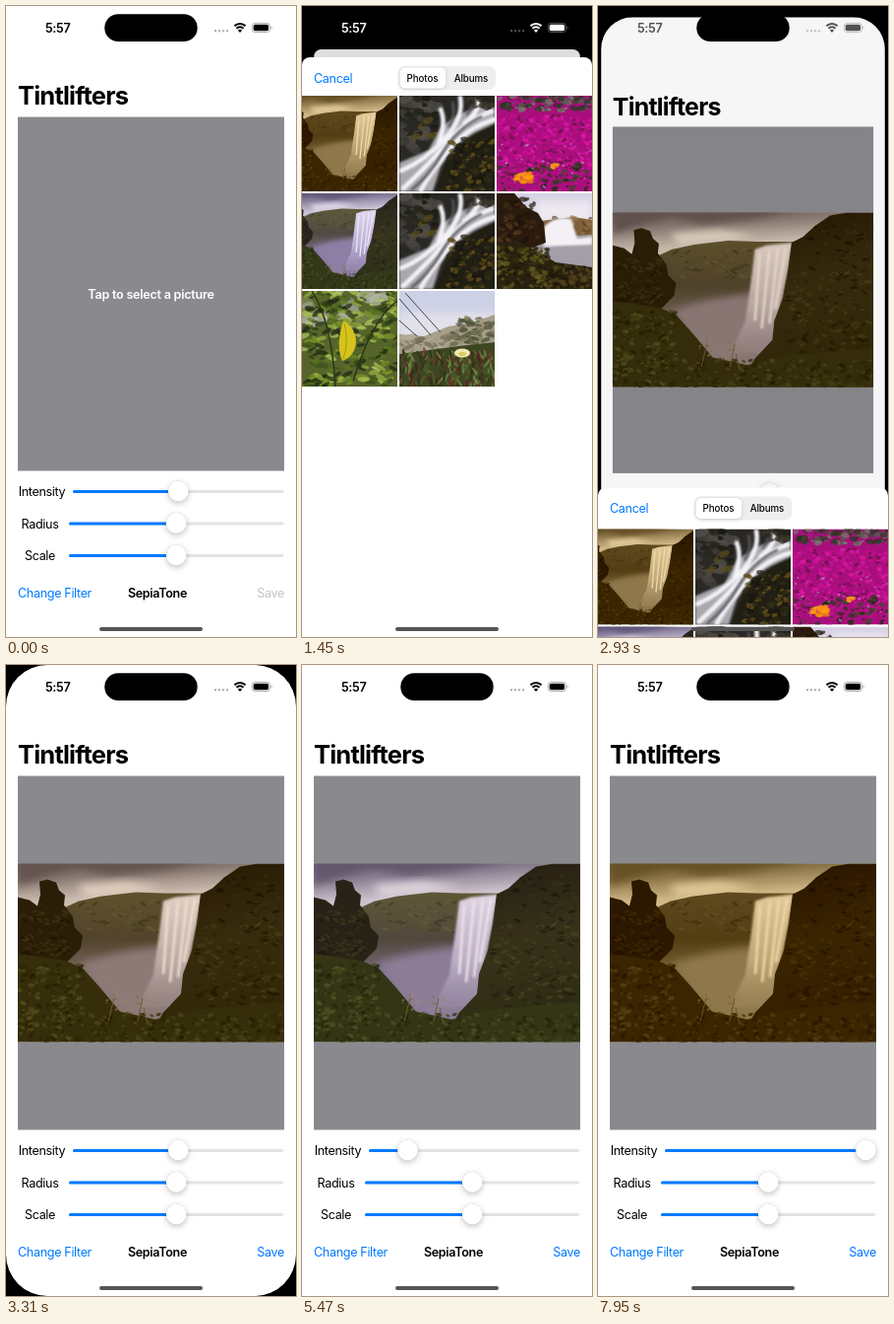
An HTML page for the animation above (8000 ms loop, 295 by 640 pixels).

```html
<!DOCTYPE html>
<html lang="en">
<head>
<meta charset="utf-8">
<title>Photo filter demo</title>
<style>
  html, body { margin: 0; height: 100%; overflow: hidden; background: #000; }
  svg { display: block; width: 100vw; height: 100vh; }
  text { font: 12.6px Inter, "Liberation Sans", sans-serif; letter-spacing: -.35px; }
  .bold { font-weight: 600; }
  .blue { fill: #007aff; }
  .mid { text-anchor: middle; }
  .title { font-size: 25.5px; font-weight: 700; letter-spacing: -.8px; }
  .tab { font-size: 9.75px; font-weight: 500; letter-spacing: -.1px; }
  .knob { fill: #fff; filter: drop-shadow(0 2px 3px rgba(0,0,0,.2)) drop-shadow(0 0 .6px rgba(0,0,0,.25)); }
</style>
</head>
<body>
<svg viewBox="0 0 295 640">
  <defs>
    <clipPath id="screen"><rect id="corners" width="295" height="640"/></clipPath>
    <filter id="tone" color-interpolation-filters="sRGB" x="0" y="0" width="1" height="1"><feColorMatrix/></filter>
    <filter id="sepia" color-interpolation-filters="sRGB" x="0" y="0" width="1" height="1"><feColorMatrix/></filter>
    <filter id="soft" x="-.3" y="-.3" width="1.6" height="1.6"><feGaussianBlur stdDeviation="4"/></filter>
    <filter id="silky" x="-.2" y="-.2" width="1.4" height="1.4"><feGaussianBlur stdDeviation="1.3"/></filter>
    <linearGradient id="sky" x2=".1" y2="1">
      <stop stop-color="#6a6080"/><stop offset=".1" stop-color="#8a809e"/><stop offset=".22" stop-color="#cbc3d8"/>
    </linearGradient>
    <linearGradient id="plateau" x2="0" y2="1">
      <stop stop-color="#5d5a3a"/><stop offset=".35" stop-color="#514a44"/><stop offset=".7" stop-color="#857799"/>
    </linearGradient>
    <linearGradient id="water" x2="0" y2="1">
      <stop stop-color="#ded5ee"/><stop offset=".6" stop-color="#b9add2"/><stop offset="1" stop-color="#9f92bb" stop-opacity=".4"/>
    </linearGradient>
    <linearGradient id="cliff" x2=".2" y2="1">
      <stop stop-color="#211d18"/><stop offset=".5" stop-color="#37331f"/><stop offset="1" stop-color="#2b3017"/>
    </linearGradient>
    <symbol id="falls" viewBox="0 0 271 181"></symbol>
    <symbol id="stream" viewBox="0 0 97 97"></symbol>
    <symbol id="flowers" viewBox="0 0 97 97"></symbol>
    <symbol id="cove" viewBox="0 0 97 97"></symbol>
    <symbol id="leaves" viewBox="0 0 97 97"></symbol>
    <symbol id="dune" viewBox="0 0 97 97"></symbol>
  </defs>
  <rect width="295" height="640"/>

  <g id="app" clip-path="url(#screen)">
    <rect width="295" height="640" fill="#fff"/>
    <g id="content">
      <text class="title" x="12" y="100.3">Tintlifters</text>
      <rect x="12" y="112.5" width="271" height="359" fill="#8a8a8e"/>
      <text class="bold mid" x="147.5" y="296.7" fill="#fff" style="letter-spacing:-.25px">Tap to select a picture</text>
      <use id="photo" href="#falls" x="12" y="201.5" width="271" height="181" filter="url(#tone)"/>
      <g id="sliders"></g>
      <text class="blue" x="12" y="599.5">Change Filter</text>
      <text class="bold mid" x="154" y="599.5">SepiaTone</text>
      <text id="save" x="283" y="599.5" text-anchor="end">Save</text>
    </g>
    <rect id="dim" width="295" height="640"/>
  </g>

  <rect x="100.3" y="8.3" width="94.4" height="27.8" rx="13.9"/>
  <g id="status" fill="currentColor">
    <text class="bold" x="40" y="26.7">5:57</text>
    <path d="M213 25.3h14" stroke="currentColor" stroke-width="2.4" stroke-linecap="round" stroke-dasharray="0 4" opacity=".3"/>
    <g fill="none" stroke="currentColor" stroke-width="2">
      <path d="M232.4 20.3a8 8 0 0 1 11.2 0M234.5 22.8a5 5 0 0 1 7 0"/>
    </g>
    <path d="M238 27l-2.1-2.2a3 3 0 0 1 4.2 0z"/>
    <rect x="250.3" y="17.4" width="18.2" height="9.2" rx="3" fill="none" stroke="currentColor" stroke-width=".8" opacity=".4"/>
    <rect x="251.7" y="18.8" width="15.4" height="6.4" rx="1.8"/>
    <path d="M269.7 20.5v3a1.7 1.7 0 0 0 0-3z" opacity=".4"/>
  </g>

  <g id="sheet">
    <rect width="295" height="660" rx="8" fill="#fff"/>
    <text class="blue" x="12" y="25.7">Cancel</text>
    <g id="loading">
      <g id="spinner" transform="translate(147.5 292.5)" stroke="#77777b" stroke-width="2.5" stroke-linecap="round"></g>
      <text class="mid" x="147.5" y="320.7" fill="#8a8a8e" style="font-size:11.25px;letter-spacing:-.25px">Loading...</text>
    </g>
    <g id="picker">
      <rect x="98" y="9" width="99" height="24" rx="6.7" fill="#eeeeef"/>
      <rect x="99.7" y="10.5" width="46.5" height="21" rx="5.3" fill="#fff" style="filter:drop-shadow(0 1.5px 2px rgba(0,0,0,.15))"/>
      <text class="tab mid bold" x="122.5" y="24.6">Photos</text>
      <text class="tab mid" x="172" y="24.6">Albums</text>
      <g id="grid"></g>
    </g>
  </g>
  <rect x="95" y="630" width="105" height="4" rx="2" fill="#555"/>
</svg>

<script>
const $ = id => document.getElementById(id);
const set = (el, attrs) => { for (const k in attrs) el.setAttribute(k, attrs[k]); };
const show = (el, on) => set(el, { visibility: on ? 'visible' : 'hidden' });
const clamp = v => Math.max(0, Math.min(1, v));
const ramp = (t, start, length) => clamp((t - start) / length);

let seed = 7;
const random = () => (seed = seed * 16807 % 2147483647) / 2147483647;

const shape = (fill, d, extra = '') => `<path fill="${fill}" d="${d}" ${extra}/>`;
const blurred = (fill, d, filter = 'soft', extra = '') => shape(fill, d, `filter="url(#${filter})" ${extra}`);
const base = fill => shape(fill, 'M0 0h97v97H0z');

// Scattered translucent ellipses inside a box, tilted around a given angle
function blobs(n, x, y, w, h, r, colors, ratio = .6, angle = 0) {
  let out = '<g fill-opacity=".7">';
  for (let i = 0; i < n; i++) {
    const size = r * (.5 + random()), cx = x + random() * w, cy = y + random() * h;
    const fill = colors[Math.floor(random() * colors.length)];
    out += `<ellipse cx="${cx}" cy="${cy}" rx="${size}" ry="${size * ratio}" fill="${fill}"
      transform="rotate(${angle + random() * 80 - 40} ${cx} ${cy})"/>`;
  }
  return out + '</g>';
}

$('falls').innerHTML =
  shape('url(#sky)', 'M0 0h271v181H0z') +
  blurred('#62587a', 'M0-8H215L150 6L95 12L60 5L25 14L0 22z') +
  blurred('#ddd6e6', 'M60 22L110 18L150 24L120 30L70 34z') +
  shape('url(#plateau)', 'M40 48L62 38L85 33L120 29L150 30L188 30L200 165H60z') +
  blobs(70, 65, 37, 78, 32, 3, ['#5a5736', '#413c30', '#625e40'], .35) +
  blurred('#8c7ea4', 'M62 102Q100 88 146 84L172 110L160 158H110z') +
  blurred('url(#water)', 'M148 38L160 34L187 31L182 60L174 100L164 146L122 146L138 112L144 70z', 'silky') +
  blurred('none', 'M153 42L148 112M163 38L155 120M172 37L163 115M180 36L169 100', 'silky', 'stroke="#ece5f6" stroke-width="2.5"') +
  shape('url(#cliff)', 'M186 31L198 25L210 14L226 3L244 0H271V181H140L147 152L166 132L168 112L177 88L182 62z') +
  blobs(70, 200, 12, 70, 50, 3, ['#2d2820', '#1c1916', '#3a3425'], .4) +
  blobs(150, 182, 62, 85, 85, 3, ['#454323', '#2b281a', '#4a4926', '#201e15'], .4) +
  shape('#28241e', 'M0 34L12 37L20 43L23 31L22 18L30 16L39 19L42 27L48 32L47 42L56 54L58 65L66 73L64 86L48 102L0 100z') +
  blobs(80, 3, 48, 50, 45, 3, ['#37321f', '#1d1a16', '#403b24'], .4) +
  shape('#323818', 'M0 92L22 94L50 99L66 106L84 126L104 150L140 158L180 148L271 140V181H0z') +
  blobs(200, 0, 102, 66, 80, 2.4, ['#454f20', '#282e16', '#515c28', '#21260f']) +
  blobs(200, 72, 152, 200, 30, 2.4, ['#3f4820', '#282e16', '#4b5327', '#21260f']) +
  shape('none', 'M92 160L98 136M122 160L127 136M132 162L128 146', 'stroke="#6d6336"') +
  blobs(20, 90, 132, 45, 16, 1.4, ['#a8857c', '#7d7348']);

$('stream').innerHTML = base('#2a2824') +
  blobs(50, 0, 0, 40, 55, 6, ['#43413c', '#56534d', '#2b2a25', '#1d1c18']) +
  blobs(30, 14, 0, 26, 42, 4, ['#5a4c1c', '#25241a', '#151510']) +
  blurred('#a9a8ad', 'M97 8L80 12L62 18L42 32L30 55L0 68V97H34L42 72L54 52L76 38L97 28z', 'silky') +
  blurred('none', 'M94 16Q66 26 50 46T4 94M62 2Q66 22 46 44T2 76M42 14Q48 28 40 48M97 24Q68 32 48 58T22 96M80 2Q84 14 66 28',
    'silky', 'stroke="#f4f3f8" stroke-width="4.5" stroke-linecap="round"') +
  blurred('none', 'M54 6Q58 20 50 32M84 21Q58 34 44 58T12 96M76 4Q74 14 68 20', 'silky', 'stroke="#58565a" stroke-width="2.5"') +
  shape('#211e13', 'M97 30L80 38L62 50L50 62L44 78L36 97H97z') +
  blobs(120, 50, 42, 47, 55, 3, ['#5d4a16', '#34301a', '#17150f', '#6a561b', '#2a2615']) +
  blobs(20, 70, 0, 27, 12, 4, ['#25241c', '#3c382a']);

$('flowers').innerHTML = base('#a80f7c') +
  blobs(90, 0, 0, 97, 15, 3, ['#3c4c32', '#77816f', '#27361f', '#565f4e']) +
  blobs(420, 0, 20, 97, 64, 2.2, ['#d0109a', '#e01ca8', '#b30c84', '#c50f90', '#641545']) +
  blobs(110, 0, 68, 97, 30, 2.5, ['#263a1a', '#3a4b24', '#c0128c', '#1c2a14']) +
  blobs(40, 0, 48, 97, 45, 1.2, ['#c79ad6', '#a565b8']) +
  blobs(30, 18, 78, 20, 10, 2.6, ['#ffa210', '#f79008']) + blobs(10, 55, 69, 7, 4, 2, ['#f8a01a']);

$('cove').innerHTML = base('#d6d2e4') +
  blurred('#eeeaf2', 'M40 8H97V30H40z') +
  shape('#80613c', 'M46 28L60 26L78 24L97 27V48H46z') +
  blobs(25, 50, 25, 47, 18, 3, ['#5f4527', '#98784e']) +
  shape('#a39ea8', 'M30 46L97 42V80H30z') +
  blurred('#f4f1f6', 'M48 34Q60 22 76 26L82 46L97 44V52L48 54z', 'silky') +
  shape('#2a1b0e', 'M0 0H18L30 14L42 20L48 30L50 50L34 56L0 62z') +
  blobs(70, 2, 6, 40, 42, 3, ['#432c13', '#1d130a', '#573a1b', '#2a1b0e']) +
  shape('#2a220f', 'M0 50L20 48L40 58L60 70L97 75V97H0z') +
  blobs(160, 0, 54, 52, 42, 2.6, ['#58501a', '#1e180b', '#686024', '#383113']) +
  blobs(90, 48, 74, 49, 22, 2.6, ['#4a3c18', '#1f180b', '#5a491e']);

$('leaves').innerHTML = base('#56642c') +
  blobs(22, 0, 0, 97, 40, 9, ['#9da08f', '#7f8a54', '#b4b8a2']) +
  blobs(260, 0, 0, 97, 97, 5, ['#7c9a26', '#2b3a14', '#9db440', '#1c270e', '#5a781e', '#b5c85c', '#3c5018'], .4) +
  shape('none', 'M10 0Q30 30 34 97M97 10Q70 30 52 92', 'stroke="#2c3616" stroke-width="1.5"') +
  shape('#d6c41c', 'M42 30Q54 36 55 52Q54 66 41 71Q34 56 42 30z') +
  shape('none', 'M43 33Q48 52 42 69', 'stroke="#a89a18"');

$('dune').innerHTML = base('#cdd1e6') +
  blurred('#e2e1ea', 'M0 22H97V50H0z') +
  shape('#a89e8c', 'M0 44L25 46L50 36L75 32L97 24V80H0z') +
  blobs(80, 55, 28, 42, 26, 3.5, ['#66694a', '#8c8465', '#4c5236'], .45) +
  blobs(35, 0, 46, 60, 12, 5, ['#857a64', '#b7ac98', '#6d6a50'], .35) +
  shape('#3c4722', 'M0 64L30 60L60 56L97 52V97H0z') +
  blobs(260, 0, 62, 97, 34, 4, ['#4f6428', '#28341a', '#6f342c', '#7a8e48', '#4d241f'], .25, 90) +
  shape('none', 'M0 8L32 45M6 2L42 42M0 30L18 46', 'stroke="#333" stroke-width=".9"') +
  '<ellipse cx="64" cy="63" rx="8" ry="4.5" fill="#eee9b5"/><ellipse cx="64" cy="64" rx="4" ry="2" fill="#d9cc5a"/>';

$('grid').innerHTML = ['falls', 'stream', 'flowers', 'falls', 'stream', 'cove', 'leaves', 'dune'].map((name, i) =>
  `<use href="#${name}" x="${i % 3 * 99}" y="${Math.floor(i / 3) * 99}" width="97" height="97"
    ${i ? '' : 'filter="url(#sepia)"'}/>`).join('');
for (const id of ['falls', 'stream', 'flowers', 'cove', 'leaves', 'dune'])
  set($(id), { preserveAspectRatio: 'xMidYMid slice' });

$('spinner').innerHTML = Array.from({ length: 8 }, (_, i) =>
  `<path d="M0-5.3V-9.8" transform="rotate(${i * 45})"/>`).join('');

const sliders = [['Intensity', 68, 492.5], ['Radius', 64, 525], ['Scale', 64, 557.5]].map(([label, left, y], i) => {
  const g = document.createElementNS('http://www.w3.org/2000/svg', 'g');
  g.innerHTML = `<text class="mid" x="${i ? 34.5 : 36.5}" y="${y + 4.6}">${label}</text>
    <rect x="${left}" y="${y - 1.5}" width="${282.5 - left}" height="3" rx="1.5" fill="#e4e4e6"/>
    <rect class="blue" x="${left}" y="${y - 1.5}" height="3" rx="1.5"/><circle class="knob" cy="${y - .5}" r="10.4"/>`;
  $('sliders').append(g);
  return value => {
    const x = left + 10 + value * (262.5 - left);
    set(g.children[2], { width: x - left });
    set(g.children[3], { cx: x });
  };
});
sliders[1](.5);
sliders[2](.5);

// Blend from the plain picture to a warm brown monochrome
function setSepia(filter, v) {
  const rows = [[1, .03], [.98, -.05], [.93, -.2]].map(([gain, offset], row) =>
    [.3, .59, .11].map((luma, col) => (row === col ? 1 - v : 0) + v * gain * luma).concat(0, v * offset).join(' '));
  set($(filter).firstElementChild, { values: rows.join(' ') + ' 0 0 0 1 0' });
}
setSepia('sepia', 1);

const spring = (ms, k) => { const x = k * ms / 1000; return 1 - (1 + x) * Math.exp(-x); };

function sheetProgress(t) {
  if (t < 500 || t >= 3310) return 0;
  if (t < 1290) return spring(t - 470, 8.3);
  return 1 - spring(Math.max(0, t - 2690), 11);
}

function intensityAt(t) {
  const keys = [[4500, .5], [5470, .152], [5930, 0], [6380, 0], [7850, 1]];
  let value = keys[0][1];
  for (let i = 1; i < keys.length; i++)
    value += (keys[i][1] - keys[i - 1][1]) * ramp(t, keys[i - 1][0], keys[i][0] - keys[i - 1][0]);
  return value;
}

function draw(t) {
  const p = sheetProgress(t), scale = 1 - .082 * p, picked = t >= 2840;
  set($('app'), { transform: `translate(${147.5 * (1 - scale)} ${44 * p}) scale(${scale})` });
  set($('corners'), { rx: t >= 500 && t < 4550 ? 42 - 34 * p : 0 });
  set($('content'), { transform: `translate(0 ${4 * p})` });
  set($('dim'), { opacity: .13 * p });
  set($('sheet'), { transform: `translate(0 ${640 - 588 * p})` });
  show($('sheet'), p > 0);

  const level = Math.round(255 * (ramp(t, 690, 300) - ramp(t, 2760, 250)));
  $('status').style.color = `rgb(${level},${level},${level})`;

  const loaded = t >= 1370, head = Math.floor(t / 100) % 8;
  $('loading').style.display = loaded ? 'none' : '';
  $('picker').style.display = loaded ? '' : 'none';
  set($('grid'), { transform: `translate(0 ${38 + 4 * ramp(t, 1370, 330)})` });
  [...$('spinner').children].forEach((spoke, i) => set(spoke, { opacity: 1 - (head - i + 8) % 8 * .11 }));

  $('photo').style.display = picked ? '' : 'none';
  set($('save'), { fill: picked ? '#007aff' : '#c4c4c6' });
  const value = intensityAt(t);
  sliders[0](value);
  setSepia('tone', value);
}

function loop() {
  draw(performance.now() % 8000);
  requestAnimationFrame(loop);
}
loop();
</script>
</body>
</html>
```
